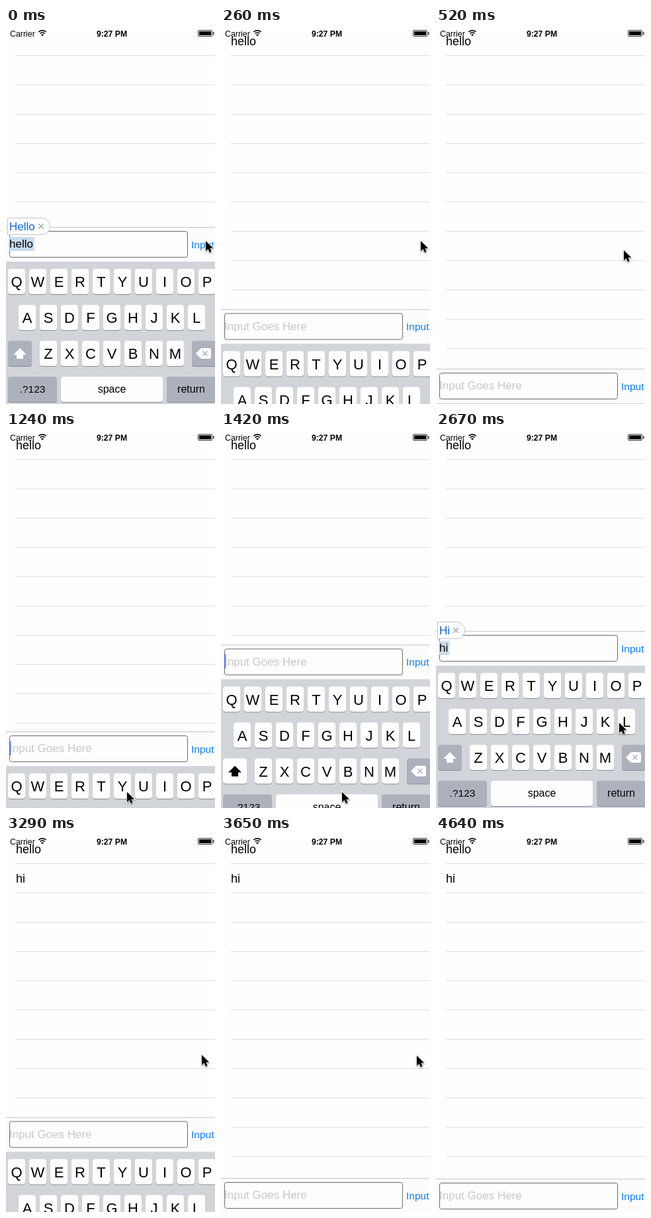
An HTML page with a canvas that plays this animation: 316 px wide and 565 px high, repeating every 5.35 s.

```html
<!DOCTYPE html>
<html lang="en">
<head>
<meta charset="utf-8">
<title>Message input</title>
<style>
html, body { margin: 0; overflow: hidden; background: #fff; }
canvas { display: block; }
</style>
</head>
<body>
<canvas id="stage" width="316" height="565"></canvas>
<script>
const ctx = document.getElementById('stage').getContext('2d');
const W = 316, H = 565, LOOP = 5350;
const BAR_Y = 299, TRAVEL = 216;
const SENT = [90, 3109], FOCUS = 1230;

// Pointer path: time, x, y
const PATH = [
  [430, 302, 320], [516, 284, 333], [606, 255, 453], [790, 205, 522], [1053, 183, 541],
  [2394, 183, 541], [2662, 277, 437], [2840, 294, 360], [3020, 296, 322],
  [3109, 296, 322], [3300, 296, 330], [3646, 296, 330], [3860, 240, 430],
  [4092, 164, 540], [4270, 172, 544], [4540, 211, 556], [4628, 215, 570]
];

function rect(x, y, w, h, color) {
  ctx.fillStyle = color;
  ctx.fillRect(x, y, w, h);
}

function round(x, y, w, h, r, fill, stroke) {
  ctx.beginPath();
  ctx.roundRect(x, y, w, h, r);
  if (fill) { ctx.fillStyle = fill; ctx.fill(); }
  if (stroke) { ctx.strokeStyle = stroke; ctx.lineWidth = 1; ctx.stroke(); }
}

function text(s, x, y, size, color = '#000', align = 'left', weight = '') {
  ctx.font = `${weight} ${size}px "Liberation Sans", Arial, sans-serif`;
  ctx.fillStyle = color;
  ctx.textAlign = align;
  ctx.fillText(s, x, y);
  return ctx.measureText(s).width;
}

function shape(d, x, y, fill, stroke, width = 1) {
  const p = new Path2D(d);
  ctx.save();
  ctx.translate(x, y);
  if (stroke) { ctx.strokeStyle = stroke; ctx.lineWidth = width; ctx.stroke(p); }
  if (fill) { ctx.fillStyle = fill; ctx.fill(p); }
  ctx.restore();
}

function cross(x, y, r, color, width) {
  shape(`M${-r} ${-r}L${r} ${r}M${r} ${-r}L${-r} ${r}`, x, y, null, color, width);
}

// Critically damped spring: 0 at the start, 1 at rest
function spring(ms) {
  const k = Math.max(0, ms) * 0.016;
  return 1 - (1 + k) * Math.exp(-k);
}

function barShift(t) {
  if (t < FOCUS - 10) return TRAVEL * spring(t - 128);
  if (t < SENT[1]) return TRAVEL * (1 - spring(t - 1163));
  return TRAVEL * spring(t - 3168);
}

function pointer(t) {
  const i = PATH.findIndex(p => p[0] >= t);
  if (i < 0) return null;
  if (i === 0) return PATH[0].slice(1);
  const [a, b] = [PATH[i - 1], PATH[i]];
  const k = (t - a[0]) / (b[0] - a[0]);
  return [a[1] + (b[1] - a[1]) * k, a[2] + (b[2] - a[2]) * k];
}

function typed(t) {
  if (t < 60) return 'hello';
  if (t < 1850 || t > 3100) return '';
  return t < 2025 ? 'h' : 'hi';
}

function list(t) {
  for (let y = 41; y < H; y += 44) rect(15, y, W - 15, 1, '#e0e0e2');
  if (t > 60) text('hello', 15, 26, 18);
  if (t > 3100) text('hi', 15, 70, 18);
}

function inputBar(y, t) {
  const value = typed(t);
  const suggest = t < 60 || (value && t > 2295);
  const focused = t > FOCUS && t < 3100;
  rect(0, y, W, 52, '#fcfcfc');
  rect(0, y, W, 1, '#c6c6c8');
  round(5.5, y + 6.5, 269, 39, 3, '#fefefe', '#6a6a6a');
  text('Input', 280, y + 31.5, 15.5, '#0a7bf5');

  let end = 5;
  if (value) {
    ctx.font = '17px "Liberation Sans", Arial, sans-serif';
    const w = ctx.measureText(value).width;
    end += w;
    if (suggest) rect(4, y + 15, w + 3, 21, '#c9dcee');
    text(value, 5, y + 31, 17);
  } else {
    text('Input Goes Here', 5, y + 31, 17, '#c7c7cd');
  }
  if (focused && (t < 2480 || t > 2900)) rect(end, y + 14, 2, 22, '#4a6df0');

  if (suggest) {
    const word = value[0].toUpperCase() + value.slice(1);
    const w = value === 'hello' ? 64 : 41;
    round(2.5, y - 13.5, w, 25, [0, 12.5, 12.5, 0], '#fff', '#c4c4c6');
    text(word, 5, y + 5, 17, '#0b66d0');
    cross(w - 11, y - 1, 3.8, '#a5a5a8', 1.4);
  }
}

function key(x, y, w, label, size = 22, fill = '#fefefe') {
  round(x, y + 1, w, 38, 4, '#898c92');
  round(x, y, w, 38, 4, fill);
  if (label) text(label, x + w / 2, y + (size > 20 ? 27 : 24), size, '#000', 'center');
}

function keyboard(y, t) {
  const grey = '#acb1bc';
  const upper = !typed(t);
  rect(0, y, W, TRAVEL, '#d1d5da');
  [['QWERTYUIOP', 3, 12], ['ASDFGHJKL', 19, 66], ['ZXCVBNM', 51, 120]].forEach(([row, x, dy]) =>
    [...row].forEach((c, i) => key(x + 32 * i, y + dy, 26, c)));

  key(3, y + 120, 36, '', 22, upper ? '#fefefe' : grey);
  shape('M0 -8L10 2H5V8H-5V2H-10Z', 21, y + 139, upper ? '#000' : '#fff');
  key(281, y + 120, 36, '', 22, grey);
  shape('M-12 0L-5 -7Q-4 -8 -2 -8H8Q11 -8 11 -5V5Q11 8 8 8H-2Q-4 8 -5 7Z', 299, y + 139, '#fff');
  cross(301, y + 139, 3.5, grey, 1.5);

  key(3, y + 174, 74, '.?123', 15.5, grey);
  key(83, y + 174, 154, 'space', 16);
  key(243, y + 174, 74, 'return', 16, grey);
}

function statusBar() {
  text('Carrier', 6, 12.5, 12.4);
  text('9:27 PM', 160, 12.5, 12.2, '#000', 'center', 'bold');
  shape('M-5.6 -5.6A8 8 0 0 1 5.6 -5.6M-3.4 -3.2A5 5 0 0 1 3.4 -3.2', 55, 11.5, null, '#000', 1.7);
  shape('M0 0.8L-2 -1.2A2.9 2.9 0 0 1 2 -1.2Z', 55, 11.5, '#000');
  round(290.5, 3.5, 21, 9, 1.5, '#fff', '#333');
  rect(292, 5, 18, 6, '#000');
  rect(313, 6, 1.5, 4, '#222');
}

function arrow([x, y]) {
  ctx.save();
  ctx.shadowColor = 'rgba(0,0,0,.35)';
  ctx.shadowBlur = 2;
  ctx.shadowOffsetY = 1;
  shape('M0 0V15L3.5 11.7L6 17L8.6 15.9L6.3 10.7H11Z', x, y, '#000', '#fff', 2);
  ctx.restore();
}

function draw(now) {
  const ms = now % LOOP;
  const t = ms < 90 ? 0 : Math.floor((ms + 20) / 89.4) * 89.4 - 20;
  const shift = Math.round(barShift(t) * 2) / 2;
  rect(0, 0, W, H, '#fefefe');
  list(t);
  keyboard(BAR_Y + 51 + shift, t);
  inputBar(BAR_Y + shift, t);
  statusBar();
  const pos = pointer(t);
  if (pos) arrow(pos.map(Math.round));
}

function loop() {
  draw(performance.now());
  requestAnimationFrame(loop);
}
loop();
</script>
</body>
</html>
```
